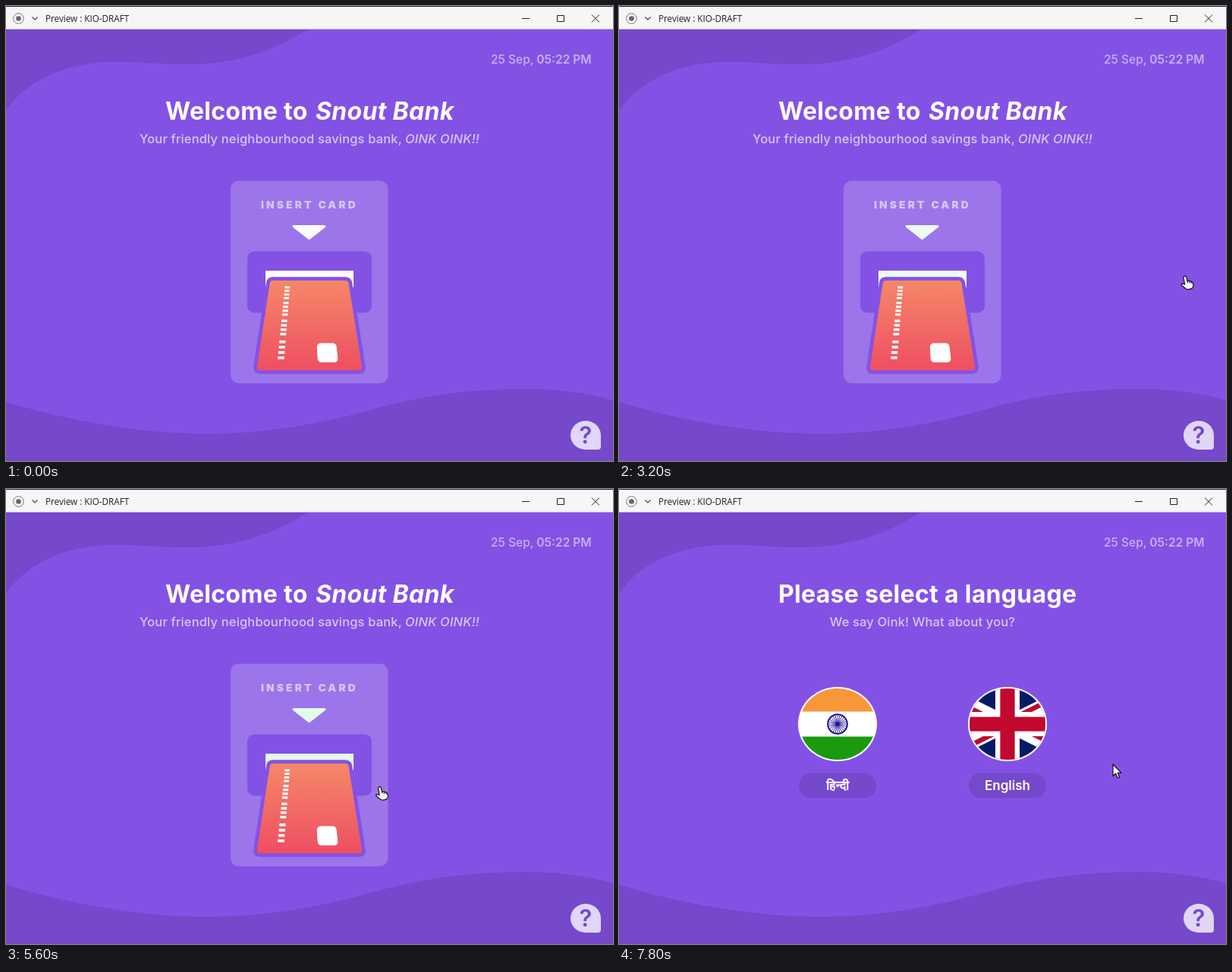
Animation of 800 by 600 pixels, one loop 8000 ms. Source, as an HTML page:

```html
<!DOCTYPE html>
<html lang="en">
<head>
<meta charset="utf-8">
<title>Kiosk preview</title>
<style>
  html, body { margin: 0; width: 100%; height: 100%; overflow: hidden; background: #8352e5; }
  svg { display: block; width: 100vw; height: 100vh; }
  text { font-family: Inter, "Noto Sans", sans-serif; fill: #fff; }
  .bar { font: 11.7px "Open Sans", "Noto Sans", sans-serif; fill: #222; }
  .title { font-size: 32px; font-weight: 700; letter-spacing: .3px; }
  .sub { font-size: 16.5px; font-weight: 500; letter-spacing: .15px; fill: #d8c7f7; }
  .date { font-size: 15.5px; font-weight: 500; fill: #c7b0f3; }
  .hint { font-size: 13.8px; font-weight: 900; letter-spacing: 3.1px; fill: #d6c5f6; }
  .lang { font-size: 17px; font-weight: 600; text-anchor: middle; }
  .help { font-size: 31px; font-weight: 600; text-anchor: middle; fill: #7548cc; }
  .semi { font-weight: 600; }
  .italic { font-style: italic; }
  .dark { fill: #7548cc; }
  .line { fill: none; stroke: #222; }
  .pointer { fill: #f4f4f4; stroke: #111; stroke-width: 1.2; stroke-linejoin: round; }
</style>
</head>
<body>
<svg viewBox="0 0 800 600" preserveAspectRatio="none">
  <defs>
    <linearGradient id="cardFill" x2="0" y2="1">
      <stop stop-color="#f58768"/><stop offset="1" stop-color="#ee4f62"/>
    </linearGradient>
    <clipPath id="disc"><ellipse rx="50" ry="47"/></clipPath>
    <clipPath id="pinwheel"><path d="M0 0h30v15zv15h-30zh-30v-15zv-15h30z"/></clipPath>
  </defs>

  <rect width="800" height="600" fill="#8352e5"/>
  <path class="dark" d="M0 31H397C345 65 290 78 230 77C190 76 160 72 130 74C75 77 25 100 0 138Z"/>
  <path class="dark" d="M0 522C90 549 180 564 265 564C345 564 415 551 490 530C560 511 620 505 685 505C730 505 770 511 800 520V600H0Z"/>

  <rect width="800" height="30.6" fill="#f6f6f6"/>
  <rect width="800" height="1" fill="#222"/>
  <circle class="line" cx="16.5" cy="16.5" r="6.8" style="stroke:#777"/>
  <circle cx="16.5" cy="16.5" r="3.3" fill="#666"/>
  <path class="line" d="M34.5 14.5L38 18L41.5 14.5" style="stroke:#555" stroke-width="1.4"/>
  <text class="bar" x="52" y="21">Preview : KIO-DRAFT</text>
  <path class="line" d="M680 16.5H690M726.5 12.5H735.5V20.5H726.5ZM772 11.5L782 21.5M782 11.5L772 21.5"/>

  <text class="date" x="639" y="76">25 Sep,</text>
  <text class="date semi" x="771.5" y="76" text-anchor="end">05:22 PM</text>

  <g id="welcome">
    <text class="title" x="210" y="150">Welcome to</text>
    <text class="title italic" x="408" y="150">Snout Bank</text>
    <text class="sub" x="176" y="181">Your friendly neighbourhood savings bank,</text>
    <text class="sub italic" x="526" y="181">OINK OINK!!</text>
    <rect x="296" y="230.5" width="207.5" height="267" rx="11" fill="#9c75ea"/>
    <text class="hint" x="336" y="266.5">INSERT CARD</text>
    <rect x="318" y="323.5" width="164" height="81" rx="9" fill="#8352e5"/>
    <g id="glow">
      <path d="M379 290.5H420L399.5 306.5Z" stroke-width="3" stroke-linejoin="round"/>
      <path d="M342 349H458V371H342Z" stroke="none"/>
    </g>
    <path d="M352 362H447Q451 362 451.6 366L469 475.5Q470 480.5 465 480.5H335Q330 480.5 331 475.5L347.6 366Q348 362 352 362Z"
      fill="url(#cardFill)" stroke="#8352e5" stroke-width="9.4" stroke-linejoin="round" paint-order="stroke"/>
    <g id="digits" fill="#fff"></g>
    <path d="M416 444.5H430Q435 444.5 435.6 449L437.3 464Q437.8 470 432 470H416.5Q411 470 410.7 465L409.8 450Q409.6 444.5 416 444.5Z" fill="#fff"/>
  </g>

  <g id="language">
    <text class="title" x="210" y="150">Please select a language</text>
    <text class="sub" x="400" y="181" text-anchor="middle">We say Oink! What about you?</text>
    <g transform="translate(288 310)">
      <ellipse rx="52" ry="49" fill="#fff"/>
      <g clip-path="url(#disc)">
        <path d="M-52-49H52V-16.5H-52Z" fill="#f8963a"/>
        <path d="M-52 16.5H52V49H-52Z" fill="#1c9a0d"/>
      </g>
      <circle r="12.8" fill="none" stroke="#1c0f96" stroke-width="2"/>
      <circle r="2.3" fill="#1c0f96"/>
      <g id="spokes" stroke="#1c0f96" stroke-width=".8"></g>
    </g>
    <g transform="translate(512 310)">
      <ellipse rx="52" ry="49" fill="#fff"/>
      <g clip-path="url(#disc)">
        <g transform="scale(3.2)" fill="none">
          <path d="M-30-15H30V15H-30Z" fill="#061b68"/>
          <path d="M-30-15L30 15M30-15L-30 15" stroke="#fff" stroke-width="6"/>
          <path d="M-30-15L30 15M30-15L-30 15" stroke="#c1082f" stroke-width="4" clip-path="url(#pinwheel)"/>
          <path d="M0-15V15M-30 0H30" stroke="#fff" stroke-width="10"/>
          <path d="M0-15V15M-30 0H30" stroke="#c1082f" stroke-width="6"/>
        </g>
      </g>
    </g>
    <rect class="dark" x="237" y="374.5" width="102" height="33" rx="16.5"/>
    <rect class="dark" x="461" y="374.5" width="102" height="33" rx="16.5"/>
    <text class="lang" x="288" y="396.5" lang="hi">हिन्दी</text>
    <text class="lang" x="512" y="396.5">English</text>
  </g>

  <path d="M764 547A20 19 0 0 1 784 566V581Q784 585 780 585H764A20 19 0 0 1 764 547Z" fill="#e1d6f7"/>
  <text class="help" x="764" y="577">?</text>

  <g id="cursor">
    <g id="hand" class="pointer">
      <path d="M-2 1Q-1.6-1 .2-.8Q1.6-.6 1.9 1L3 5.6Q5 4.8 5.8 6.2Q7.6 5.4 8.4 7Q10 6.6 10.4 8.4L11 12Q10.8 14.2 9 15.4Q5 17.4 1.6 16.2Q-1.6 13.6-4.6 11.2Q-5.6 9.4-3.4 9.2L-.4 10.2Z"/>
      <path d="M3 5.6L3.6 8.4M5.8 6.2L6.3 8.6M8.4 7L8.8 9" stroke-width=".9"/>
    </g>
    <path id="arrow" class="pointer" d="M0 0V15.5L3.6 12.2L6 18L8.6 17L6.2 11.3H11Z"/>
  </g>
</svg>
<script>
const LOOP = 8000, STEP = 200, TAP = 6600;
const WHITE = [252, 252, 252], GREEN = [100, 243, 152];
const $ = id => document.getElementById(id);
const clamp = v => Math.min(1, Math.max(0, v));
const ease = v => v < .5 ? 4 * v ** 3 : 1 - 4 * (1 - v) ** 3;
const mix = (a, b, k) => a + (b - a) * k;

// time, x, y of the pointer's hot spot
const path = [[3000, 764, 354], [3200, 746, 357], [4800, 564, 380], [6400, 421, 407], [6800, 424, 407], [7800, 651, 363]];

let dashes = '';
[371, 391.5, 415, 442.5].forEach((top, group) => {
  for (let i = 0; i < 4; i++) {
    const y = top + i * [4.7, 5.1, 5.8, 7][group];
    const w = 6.5 + (y - 371) * .022;
    const x = 370.8 - (y - 371) * .09 - w / 2;
    dashes += `<rect x="${x}" y="${y - 1.4}" width="${w}" height="${2.8 + group * .25}"/>`;
  }
});
$('digits').innerHTML = dashes;
$('spokes').innerHTML = Array.from({ length: 24 }, (_, i) =>
  `<path d="M0 0V-12" transform="rotate(${i * 15})"/>`).join('');

function glowAt(t) {
  const p = t % 1510;
  return ease(clamp((p - 40) / 480)) - ease(clamp((p - 760) / 480));
}

function pointAt(t) {
  const next = path.findIndex(p => p[0] > t);
  if (next < 0) return path[path.length - 1].slice(1);
  const a = path[Math.max(0, next - 1)], b = path[next];
  const k = clamp((t - a[0]) / (b[0] - a[0] || 1));
  return [mix(a[1], b[1], k), mix(a[2], b[2], k)];
}

function draw(now) {
  const t = Math.floor(now % LOOP / STEP) * STEP;
  const g = glowAt(t);
  const color = `rgb(${WHITE.map((c, i) => Math.round(mix(c, GREEN[i], g)))})`;
  $('glow').setAttribute('fill', color);
  $('glow').setAttribute('stroke', color);

  const shown = t < TAP ? 0 : t < TAP + STEP ? .5 : 1;
  $('welcome').setAttribute('opacity', 1 - shown);
  $('language').setAttribute('opacity', shown);

  $('cursor').setAttribute('display', t < path[0][0] ? 'none' : 'inline');
  $('cursor').setAttribute('transform', `translate(${pointAt(t)})`);
  $('hand').setAttribute('display', shown < 1 ? 'inline' : 'none');
  $('arrow').setAttribute('display', shown < 1 ? 'none' : 'inline');
}

const start = performance.now();
function tick() {
  draw(performance.now() - start);
  requestAnimationFrame(tick);
}
tick();
</script>
</body>
</html>
```
